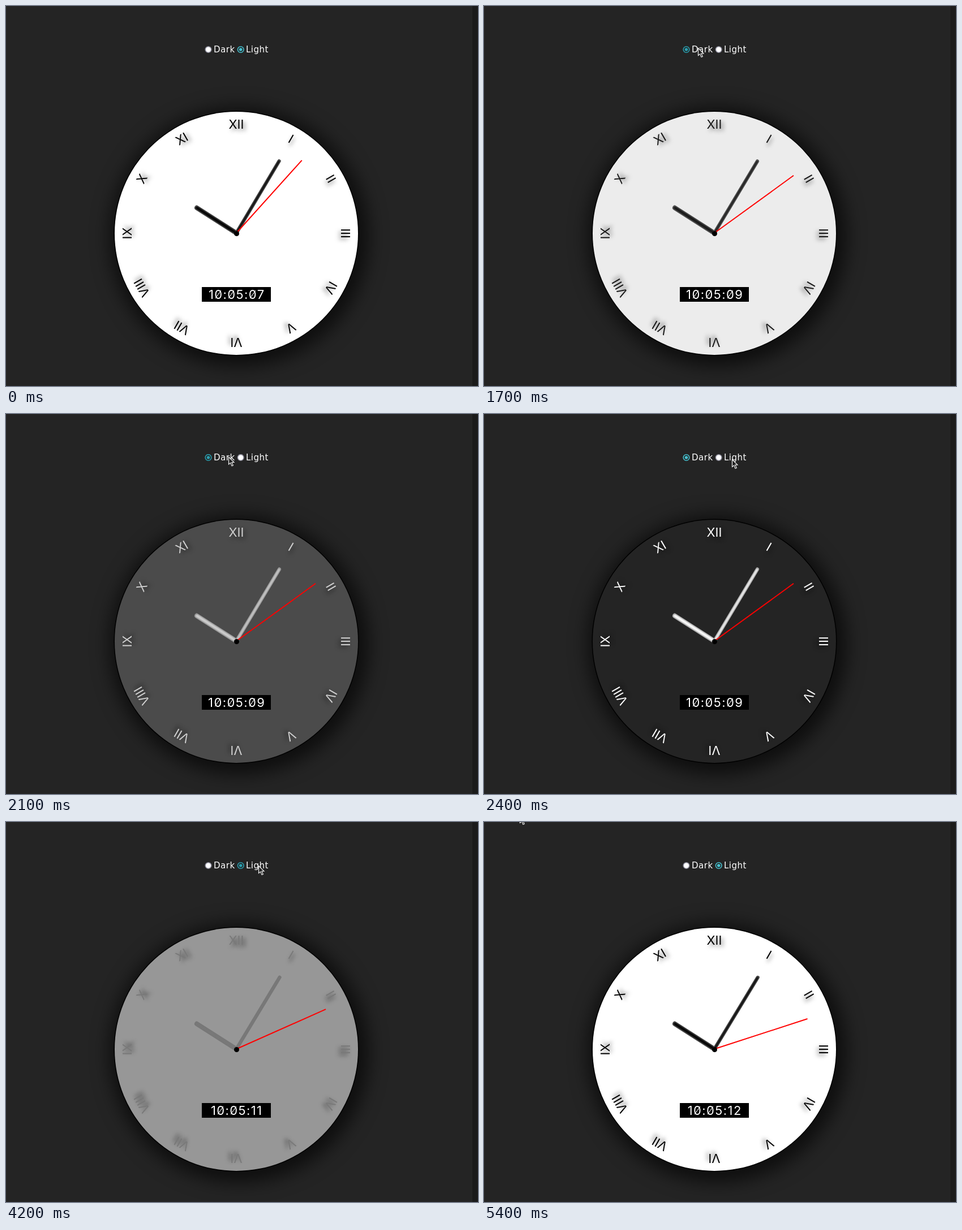
An HTML page for the animation above (5.5 s loop, 834 px wide and 672 px high).

```html
<!DOCTYPE html>
<html lang="en">
<head>
<meta charset="utf-8">
<title>Clock</title>
<style>
html, body { margin: 0; width: 100%; height: 100%; overflow: hidden; background: #242424; }
#stage { position: relative; width: 834px; height: 672px; overflow: hidden; background: #242424; color: #fff; }
#stage div, #stage svg { position: absolute; }
#bar { left: 824px; top: 0; width: 10px; height: 672px; background: #1b1b1b; }
#dial {
  left: 192px; top: 187px; width: 430px; height: 430px; border-radius: 50%;
  background: var(--face); color: var(--ink);
  box-shadow: 0 0 0 1.5px #000, 5px 6px 32px 14px rgba(0, 0, 0, .62);
}
.num {
  left: 185px; top: 200px; width: 60px; height: 30px;
  font: 22px/30px Inter, sans-serif; text-align: center;
  text-shadow: 4px 4px 7px rgba(0, 0, 0, .5);
}
.hand { bottom: 215px; transform-origin: 50% 100%; }
.rod { background: var(--ink); border-radius: 4px; box-shadow: inset 0 0 3px 1px #777; }
#hour { left: 211px; width: 8px; height: 87px; }
#minute { left: 212px; width: 6px; height: 151px; }
#second { left: 214px; width: 2px; height: 173px; background: #f00; }
#pin { left: 210.5px; top: 210.5px; width: 9px; height: 9px; border-radius: 50%; background: #000; }
#digital {
  left: 154px; top: 310px; width: 122px; height: 26px; background: #000; color: #fff;
  font: 22px/26px Inter, sans-serif; letter-spacing: 1.4px;
  text-align: center; text-indent: 1.4px; white-space: nowrap;
}
/* slashed zero */
#digital i {
  font-style: normal;
  background: linear-gradient(to bottom right, transparent 46%, #fff 48% 52%, transparent 54%) 2px center / 10px 14px no-repeat;
}
.label { top: 67px; height: 20px; font: 15px/20px "DejaVu Sans", sans-serif; letter-spacing: .5px; white-space: nowrap; }
</style>
</head>
<body>
<div id="stage">
  <div id="bar"></div>
  <svg width="834" height="100" stroke-width="1.6">
    <g id="dark" transform="translate(357.5 77)"><circle r="5.3"/><circle r="2.8" stroke="none"/></g>
    <g id="light" transform="translate(414.7 77)"><circle r="5.3"/><circle r="2.8" stroke="none"/></g>
  </svg>
  <div class="label" style="left:367px">Dark</div>
  <div class="label" style="left:424px">Light</div>
  <div id="dial">
    <div id="digital"></div>
    <div id="hour" class="hand rod"></div>
    <div id="minute" class="hand rod"></div>
    <div id="second" class="hand"></div>
    <div id="pin"></div>
  </div>
  <svg id="cursor" width="14" height="20" style="overflow:visible">
    <path d="M.5 .5V13.6L3.6 10.8 6 16.4 8.3 15.4 5.9 10H10Z" fill="#222" stroke="#fff" stroke-width="1.1"/>
  </svg>
</div>
<script>
const LOOP = 5500, STEP = 100;
const $ = id => document.getElementById(id);
const dial = $('dial');

// [time, shown second]
const ticks = [[0, 7], [700, 8], [1600, 9], [3200, 10], [3700, 11], [4600, 12]];
// [time, x, y, glide to the next entry]
const path = [
  [0, -50, -50], [600, 127, -8, true], [1100, 378, 74], [2000, 378, 74, true],
  [2400, 438, 80], [3200, 446, 77], [5100, 121, 18], [5400, 63, -12]
];
const toDark = { start: 1535, span: 800 };
const toLight = { start: 3737, span: 900 };

'XII I II III IV V VI VII VIII IX X XI'.split(' ').forEach((text, i) => {
  const num = document.createElement('div');
  num.className = 'num';
  num.textContent = text;
  num.style.transform = `rotate(${i * 30}deg) translateY(-193px)`;
  dial.prepend(num);
});

const lastIndex = (list, t) => list.findLastIndex(item => item[0] <= t);
const mix = (a, b, k) => a + (b - a) * k;
const grey = v => `rgb(${v}, ${v}, ${v})`;

function easeInOut(x) {
  if (x <= 0) return 0;
  if (x >= 1) return 1;
  let lo = 0, hi = 1, s = .5;
  for (let i = 0; i < 20; i++) {
    const r = 1 - s;
    if (1.26 * s * r * r + 1.74 * s * s * r + s ** 3 < x) lo = s; else hi = s;
    s = (lo + hi) / 2;
  }
  return s * s * (3 - 2 * s);
}

const progress = (fade, t) => easeInOut((t - fade.start) / fade.span);

function setRadio(id, on, hover) {
  const [ring, dot] = $(id).children;
  const teal = hover ? '#2a9fb0' : '#46c0cf';
  ring.setAttribute('stroke', on ? teal : '#8f8f9d');
  ring.setAttribute('fill', on ? '#222' : '#fff');
  dot.setAttribute('fill', on ? teal : '#fff');
}

// the hands pivot half a pixel above the middle of the dial
const turn = (id, deg) => { $(id).style.transform = `translateY(-.5px) rotate(${deg}deg)`; };

function moveCursor(t) {
  const i = lastIndex(path, t);
  let [start, x, y, glide] = path[i];
  if (glide) {
    const [end, nx, ny] = path[i + 1];
    const k = (t - start) / (end - start);
    x = mix(x, nx, k);
    y = mix(y, ny, k);
  }
  $('cursor').style.transform = `translate(${x}px, ${y}px)`;
}

function draw(t) {
  const dark = progress(toDark, t) - progress(toLight, t);
  dial.style.setProperty('--face', grey(mix(255, 36, dark)));
  dial.style.setProperty('--ink', grey(mix(0, 255, dark)));

  const sec = ticks[lastIndex(ticks, t)][1];
  const min = 5 + sec / 60;
  turn('second', sec * 6);
  turn('minute', min * 6);
  turn('hour', 300 + min / 2);
  const time = '10:05:' + String(sec).padStart(2, '0');
  $('digital').innerHTML = time.replace(/0/g, '<i>0</i>');

  const darkOn = t >= 1500 && t < 3600;
  setRadio('dark', darkOn, t < 2200);
  setRadio('light', !darkOn, t >= 3600 && t < 5100);
  moveCursor(t);
}

const begin = performance.now();
function frame() {
  const t = (performance.now() - begin) % LOOP;
  draw(Math.floor(t / STEP) * STEP);
  requestAnimationFrame(frame);
}
frame();
</script>
</body>
</html>
```
